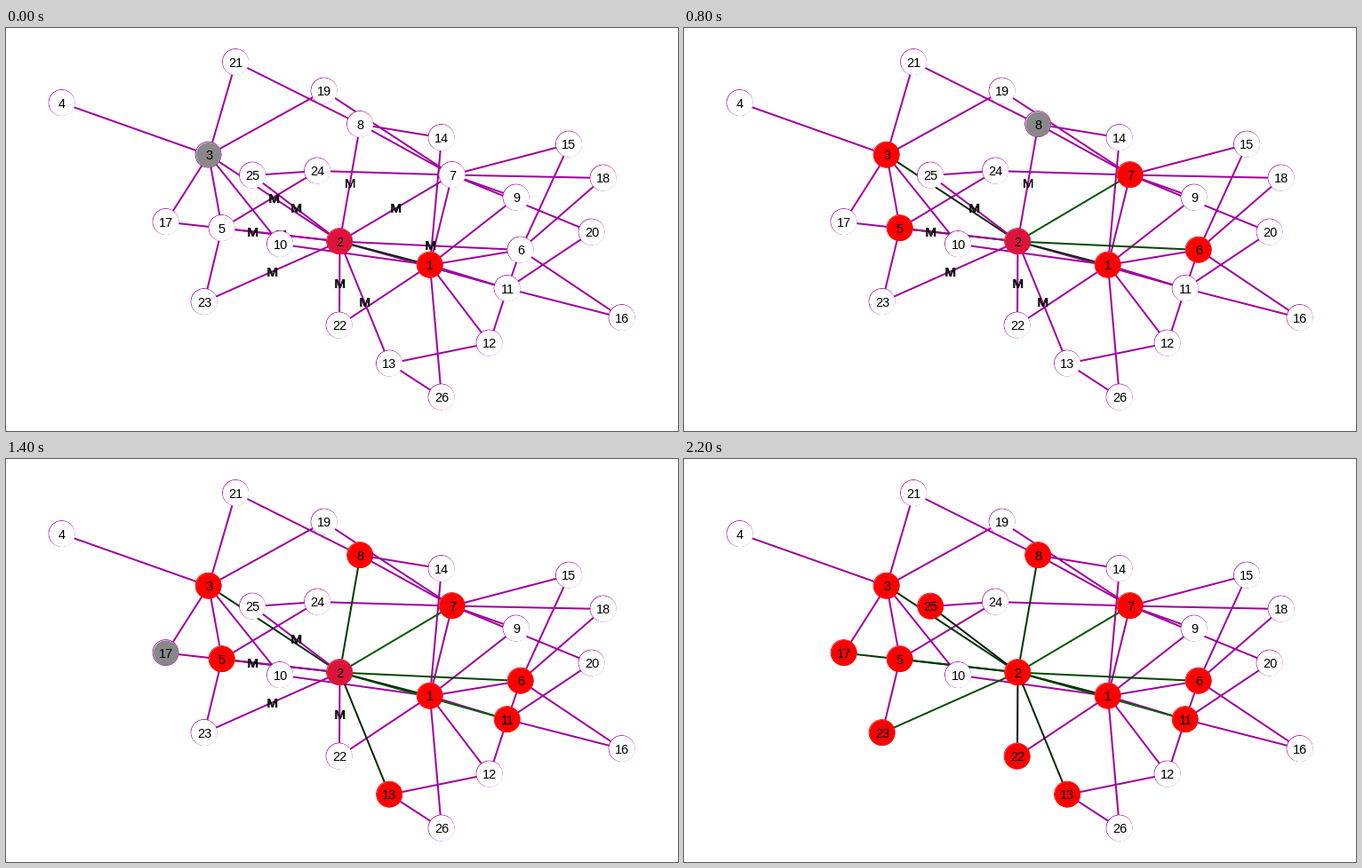
Write a matplotlib script that moves like this. It is 756 px wide and 454 px high and loops after 8000 ms.

```python
import matplotlib.pyplot as plt
from matplotlib.animation import FuncAnimation
from matplotlib.patches import Circle

W, H, DPI = 756, 454, 100
STEP_MS, STEPS = 200, 40
HUB = 2
PURPLE, RED, CRIMSON, GRAY = "#a000a0", "#ff0000", "#dc143c", "#888888"
RADIUS = 14.5

NODES = {
    1: (477, 267), 2: (375.5, 240.5), 3: (228, 143), 4: (63, 84.5),
    5: (243, 225.5), 6: (579, 250), 7: (502, 165.5), 8: (398.5, 108.5),
    9: (574, 191), 10: (308.5, 243.5), 11: (564, 293.5), 12: (544, 355),
    13: (431.5, 378), 14: (490, 123.5), 15: (633.5, 131), 16: (693, 326.5),
    17: (180, 218.5), 18: (672, 169), 19: (358, 71), 20: (659, 230),
    21: (258.5, 38.5), 22: (375, 335), 23: (223, 308.5), 24: (350.5, 161),
    25: (277.5, 166), 26: (490, 416),
}

LINKS = {
    1: (6, 7, 9, 10, 11, 12, 14, 22, 26),
    3: (4, 5, 10, 17, 19, 21),
    5: (23, 24),
    6: (11, 15, 16, 18),
    7: (8, 9, 15, 18, 19, 20, 24),
    8: (14, 21),
    11: (12, 16, 20),
    13: (12, 26),
    24: (25,),
}

# Order in which the hub's neighbours are visited.
VISITS = [3, 5, 6, 7, 8, 11, 13, 17, 22, 23, 25]

# Later spokes lie on top of earlier ones; values are their visited colours.
SPOKES = {
    3: "#053005", 5: "#004000", 6: "#004800", 7: "#005800", 8: "#003800",
    11: "#006000", 13: "#042a04", 17: "#003c00", 22: "#140f14",
    23: "#005000", 25: "#041e04", 1: "#0c2a0c",
}


def px(n):
    return n * 72 / DPI


fig = plt.figure(figsize=(W / DPI, H / DPI), dpi=DPI, facecolor="white")
ax = fig.add_axes([0, 0, 1, 1])
ax.set_xlim(0, W)
ax.set_ylim(H, 0)
ax.axis("off")


def link(a, b, z):
    (x0, y0), (x1, y1) = NODES[a], NODES[b]
    return ax.plot([x0, x1], [y0, y1], color=PURPLE, lw=px(2), zorder=z)[0]


def label(x, y, text, size, z):
    return ax.text(x, y + 0.35 * size, text, fontsize=px(size), zorder=z,
                   family="Liberation Sans", color="black",
                   ha="center", va="baseline")


def message(node):
    x = (NODES[node][0] + NODES[HUB][0]) / 2
    y = (NODES[node][1] + NODES[HUB][1]) / 2
    return [label(x + dx, y, "M", 15, 3) for dx in (-0.5, 0.5)]


def disc(node):
    x, y = NODES[node]
    ring = Circle((x - 0.4, y - 0.4), RADIUS, fc="white", ec=PURPLE,
                  lw=px(0.8), zorder=4)
    fill = Circle((x, y), RADIUS, fc="white", ec="none", zorder=5)
    ax.add_patch(ring)
    ax.add_patch(fill)
    label(x, y, str(node), 14.5, 6)
    return ring, fill


for a, ends in LINKS.items():
    for b in ends:
        link(a, b, 1)
spokes = {n: link(HUB, n, 2) for n in SPOKES}
messages = {n: message(n) for n in VISITS}
discs = {n: disc(n) for n in NODES}


def paint(node, color):
    ring, fill = discs[node]
    fill.set_facecolor(color)
    fill.set_radius(RADIUS - 0.5 if color == GRAY else RADIUS)
    ring.set_edgecolor(color if color in (RED, CRIMSON) else PURPLE)


def update(i):
    step = min(i, len(VISITS))
    done = {1, *VISITS[:step]}
    for n in NODES:
        paint(n, RED if n in done else "white")
    if step < len(VISITS):
        paint(VISITS[step], GRAY)
        paint(HUB, CRIMSON)
    else:
        paint(HUB, RED)
    for n, line in spokes.items():
        line.set_color(SPOKES[n] if n in done else PURPLE)
    for n, marks in messages.items():
        for mark in marks:
            mark.set_visible(n not in done)
    return []


anim = FuncAnimation(fig, update, frames=STEPS, interval=STEP_MS,
                     init_func=lambda: update(0), repeat=True, repeat_delay=0)
plt.show()
```
